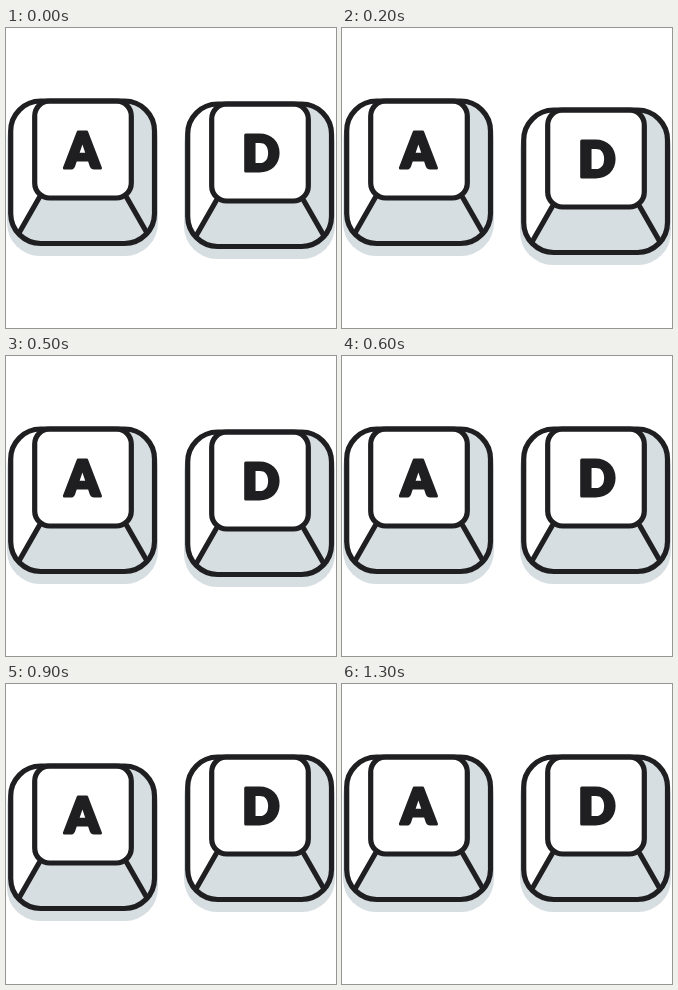
Animation of 330x300 px, one loop 1.4 s. Source, as an HTML page:

```html
<!DOCTYPE html>
<html lang="en">
<head>
<meta charset="utf-8">
<title>A and D keys</title>
<style>
  html, body { margin: 0; width: 100%; height: 100%; overflow: hidden; background: #fff; }
  svg { display: block; width: 330px; height: 300px; }
  .ink { fill: none; stroke: #1f1f21; stroke-width: 5.2; stroke-linecap: round; }
  .shade { fill: #d7dee1; }
  text {
    font: 900 49px Lato, sans-serif;
    text-anchor: middle;
    fill: #1f1f21;
    stroke: #1f1f21;
    stroke-width: 3;
    stroke-linejoin: round;
  }
</style>
</head>
<body>
<svg viewBox="0 0 330 300">
  <defs>
    <clipPath id="body"><rect x="4.7" y="73" width="143.8" height="142.5" rx="30"/></clipPath>
    <g id="key">
      <rect class="shade" x="1" y="79" width="151" height="149" rx="33"/>
      <g clip-path="url(#body)">
        <rect width="155" height="230" fill="#fff"/>
        <path class="shade" d="M120 70H155V230H-1L35 168H120Z"/>
      </g>
      <rect x="28.7" y="73" width="96.6" height="97" rx="15" fill="#fff"/>
      <path class="ink" d="M33 170L13 205M121 170L141 205"/>
      <rect class="ink" x="28.7" y="73" width="96.6" height="97" rx="15"/>
      <rect class="ink" x="4.7" y="73" width="143.8" height="142.5" rx="30"/>
    </g>
  </defs>
  <g id="left"><use href="#key"/><text x="76.5" y="139.5">A</text></g>
  <g id="right"><use href="#key" x="177"/><text x="255" y="139.5">D</text></g>
</svg>
<script>
  const LOOP = 1400, STEP = 100, DROP = 3;
  const left = document.getElementById("left");
  const right = document.getElementById("right");

  // A press sinks for three steps, holds at the bottom, then rises for three.
  function depth(step, start) {
    const n = (step - start + 14) % 14;
    return DROP * Math.max(0, Math.min(n, 3, 7 - n));
  }

  function draw() {
    const step = Math.floor(performance.now() % LOOP / STEP);
    left.setAttribute("transform", `translate(0 ${depth(step, 6)})`);
    right.setAttribute("transform", `translate(0 ${depth(step, 13)})`);
    requestAnimationFrame(draw);
  }
  draw();
</script>
</body>
</html>
```
